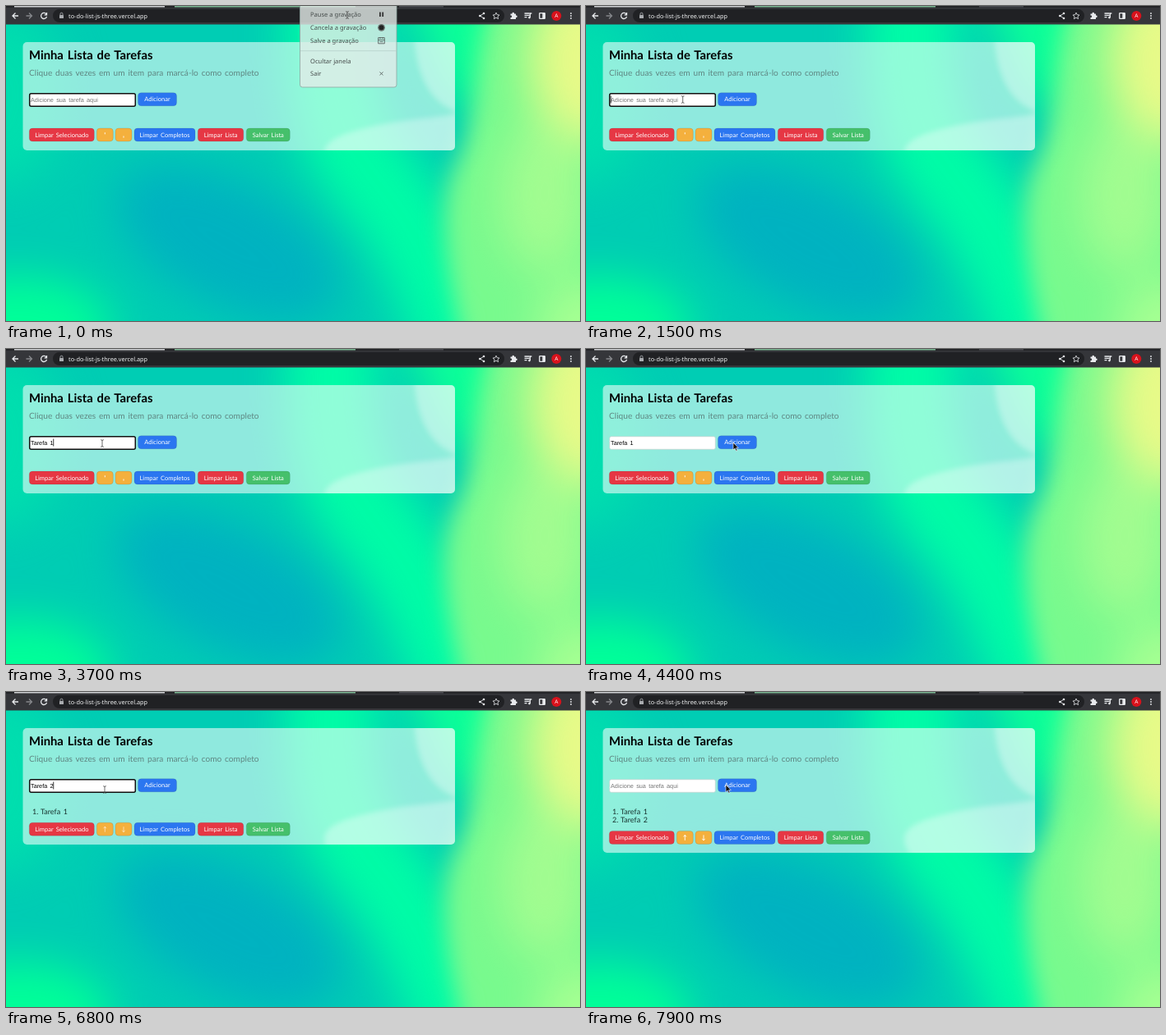
An HTML page that plays this animation: 698 by 384 pixels, repeating every 8 s.

```html
<!DOCTYPE html>
<html lang="pt-BR">
<head>
<meta charset="utf-8">
<title>Minha Lista de Tarefas</title>
<style>
html, body { margin: 0; width: 100%; height: 100%; overflow: hidden; background: #00cdb4; }
svg { display: block; width: 698px; height: 384px; }
text { text-rendering: geometricPrecision; white-space: pre; }
.page { font-family: Lato, "Open Sans", sans-serif; word-spacing: .08em; }
.ui { font-family: "Noto Sans", "Open Sans", sans-serif; }
.field { font: 7.27px "Liberation Sans", Arial, sans-serif; }
.btn { font-size: 7.5px; fill: #fff; text-anchor: middle; }
.item { font-size: 9px; fill: #16302c; }
.line { fill: none; stroke: #e8eaed; stroke-width: 1.3; }
</style>
</head>
<body>
<svg viewBox="0 0 698 384">
  <defs>
    <filter id="soft" x="-20%" y="-20%" width="140%" height="140%" color-interpolation-filters="sRGB"><feGaussianBlur stdDeviation="27"/></filter>
    <filter id="mild" x="-20%" y="-20%" width="140%" height="140%"><feGaussianBlur stdDeviation="3"/></filter>
    <filter id="edge" x="-20%" y="-20%" width="140%" height="140%" color-interpolation-filters="sRGB"><feGaussianBlur stdDeviation="14"/></filter>
    <clipPath id="cardClip"><rect id="clipRect" x="20.5" y="44" width="525.5" rx="5"/></clipPath>
  </defs>

  <rect width="698" height="384" fill="#00cdb4"/>
  <g filter="url(#soft)">
    <ellipse cx="0" cy="110" rx="70" ry="110" fill="#00deae"/>
    <ellipse cx="15" cy="395" rx="115" ry="65" fill="#00ff98"/>
    <ellipse cx="270" cy="290" rx="150" ry="75" transform="rotate(28 270 290)" fill="#00b2c0"/>
    <path d="M400-40C390 60 390 140 440 200S520 300 560 440" fill="none" stroke="#00fca6" stroke-width="110"/>
    <path d="M470-50H760V120H540Z" fill="#0cff98"/>
  </g>
  <g filter="url(#edge)">
    <path d="M598-30C562 60 578 140 545 195C525 240 530 300 560 430H760V-30Z" fill="#78fa8e"/>
  </g>
  <g filter="url(#soft)">
    <ellipse cx="705" cy="65" rx="70" ry="105" fill="#e8fa88"/>
    <ellipse cx="655" cy="230" rx="55" ry="95" fill="#a2fc90"/>
    <ellipse cx="705" cy="395" rx="60" ry="60" fill="#a8ff92"/>
  </g>

  <g clip-path="url(#cardClip)">
    <rect x="20" y="44" width="527" height="160" fill="#fff" opacity=".56"/>
    <g fill="#fff" opacity=".32" filter="url(#mild)">
      <path d="M387 178C388 160 425 150 470 142C505 136 535 136 560 128V215H415C400 205 387 195 387 178Z"/>
      <path d="M496 30C498 80 512 122 560 132V30Z"/>
    </g>
  </g>

  <g class="page">
    <text x="28" y="64.5" font-size="14.8" font-weight="700">Minha Lista de Tarefas</text>
    <text x="28" y="85" font-size="10.15" fill="#5f8682">Clique duas vezes em um item para marcá-lo como completo</text>
    <rect id="box" x="28.7" y="106.7" width="128.6" height="15.6" rx="2" fill="#fff"/>
    <text id="value" class="field" x="30" y="116.6"></text>
    <path id="caret" stroke="#000" stroke-width=".8"/>
    <g id="addBtn"></g>
    <g id="items"></g>
    <g id="actions"></g>
  </g>

  <g class="ui">
    <rect width="698" height="22.5" fill="#35363a"/>
    <rect width="698" height="1.7" fill="#202124"/>
    <path d="M10 .7H193" stroke="#cfd1d4" stroke-width="1.4"/>
    <path d="M205 .7H425" stroke="#7cb894" stroke-width="1.4"/>
    <path d="M478 .7H532" stroke="#4a4b50" stroke-width="1.4"/>
    <rect x="57" y="3.7" width="549" height="16.4" rx="8.2" fill="#202124"/>
    <g class="line">
      <path d="M15 12H8M11.5 8.5L8 12L11.5 15.5"/>
      <path d="M24.5 12H31.5M28 8.5L31.5 12L28 15.5" stroke="#85878b"/>
      <path d="M49 10A3.5 3.5 0 1 0 49.5 12.8M49.5 8V10.8H46.7"/>
      <path d="M66 11V9.7a1.5 1.5 0 0 1 3 0V11" stroke-width=".9" stroke="#a9acb0"/>
      <path d="M581 9L576.5 12L581 15" stroke-width=".9"/>
      <path d="M596 8L597.2 10.7L600 11L597.9 12.9L598.6 15.7L596 14.2L593.4 15.7L594.1 12.9L592 11L594.8 10.7Z" stroke-width=".8"/>
      <path d="M630.5 9H636.5M630.5 11.3H636.5M630.5 13.6H633.5M637.3 14V9H639.3"/>
      <rect x="648.7" y="8.7" width="6.6" height="6.6" rx=".6"/>
    </g>
    <g fill="#e8eaed">
      <rect x="65" y="11" width="5" height="4" rx=".6" fill="#a9acb0"/>
      <circle cx="581" cy="9" r="1.3"/><circle cx="576.3" cy="12" r="1.3"/><circle cx="581" cy="15" r="1.3"/>
      <path d="M613.5 9.5H615.5A1.3 1.3 0 1 1 618 9.5H620V11.5A1.3 1.3 0 1 1 620 14V16H613.5V14A1.3 1.3 0 1 0 613.5 11.5Z"/>
      <circle cx="636.4" cy="14.1" r="1.3"/>
      <rect x="652.3" y="8.7" width="3" height="6.6"/>
      <circle cx="687" cy="9" r=".9"/><circle cx="687" cy="12" r=".9"/><circle cx="687" cy="15" r=".9"/>
    </g>
    <circle cx="669.3" cy="12" r="6" fill="#d8121c"/>
    <text x="669.3" y="14.4" font-size="6.5" fill="#fff" text-anchor="middle">A</text>
    <text x="76" y="14.6" font-size="7.3" fill="#f1f3f4">to-do-list-js-three.vercel.app</text>

    <g id="menu">
      <path d="M357.5-5V96a3 3 0 0 0 3 3H472a3 3 0 0 0 3-3V-5Z" fill="#e4ebe9" fill-opacity=".8" stroke="#8fa5a0" stroke-width=".8"/>
      <path d="M358 54.7H475" stroke="#b4ccc6" stroke-width=".7"/>
      <g id="menuText" font-size="7.55" fill="#474d4c"></g>
      <path d="M454.9 7.5V13M458.2 7.5V13" stroke="#333" stroke-width="1.8"/>
      <circle cx="456.5" cy="26.3" r="4.4" fill="#6c7472"/><circle cx="456.5" cy="26.3" r="3" fill="#222"/>
      <g fill="none" stroke="#5a6361" stroke-width=".9">
        <path d="M452.7 38.6H460.3V45.8H452.7ZM452.7 41.4H460.3M455 38V40M458 38V40M454.5 43.6H458.5"/>
        <path d="M454.5 80.4L458.5 84.4M458.5 80.4L454.5 84.4"/>
      </g>
    </g>
  </g>

  <g id="cursor">
    <path id="arrow" d="M0 0V9L2.1 7.1L3.6 10.3L5 9.7L3.6 6.6H6.3Z" fill="#111" stroke="#fff" stroke-width=".6"/>
    <path id="beam" d="M-1.8-4.3Q0-4.3 0-3.4Q0-4.3 1.8-4.3M0-3.8V3.8M-1.8 4.3Q0 4.3 0 3.4Q0 4.3 1.8 4.3" fill="none" stroke="#444" stroke-width=".8"/>
  </g>
</svg>
<script>
const LOOP = 8000, STEP = 100;
const RED = '#e63744', AMBER = '#f4b03d', BLUE = '#2b76f0', GREEN = '#45c06b';
const $ = id => document.getElementById(id);
const set = (el, attrs) => { for (const k in attrs) el.setAttribute(k, attrs[k]); };
const show = (el, on) => { el.style.display = on ? '' : 'none'; };

// Cursor path: time, x, y
const path = [
  [0, 415, 11], [100, 392, 30], [300, 230, 74], [500, 128, 97], [900, 122, 108],
  [1600, 117, 115], [3900, 117, 115], [4000, 140, 117], [4200, 179, 114],
  [4600, 179, 114], [5000, 120, 119], [7300, 120, 119], [7600, 170, 113], [8000, 170, 113]
];
// Field contents: time, text
const typing = [
  [0, ''], [2100, 'T'], [2200, 'Ta'], [2300, 'Tar'], [2400, 'Tare'], [2600, 'Taref'],
  [2700, 'Tarefa'], [3200, 'Tarefa '], [3400, 'Tarefa 1'], [4500, ''], [6200, 'T'],
  [6400, 'Tare'], [6500, 'Tarefa'], [6700, 'Tarefa '], [6800, 'Tarefa 2'], [7800, '']
];
const focus = [[0, true], [4400, false], [5100, true], [7700, false]];
const count = [[0, 0], [4500, 1], [7800, 2]];

const at = (steps, t) => steps.filter(s => s[0] <= t).pop()[1];

function cursorAt(t) {
  const i = Math.max(1, path.findIndex(p => p[0] > t));
  const [t0, x0, y0] = path[i - 1], [t1, x1, y1] = path[i];
  const k = (t - t0) / (t1 - t0);
  return [x0 + (x1 - x0) * k, y0 + (y1 - y0) * k];
}

const button = (x, w, y, color, label) =>
  `<rect x="${x}" y="${y}" width="${w}" height="16" rx="4" fill="${color}" stroke="#123" stroke-opacity=".14" stroke-width=".8"/>` +
  `<text class="btn" x="${x + w / 2}" y="${y + 10.6}">${label}</text>`;

$('addBtn').innerHTML = button(160.5, 47, 105.7, BLUE, 'Adicionar');
$('actions').innerHTML =
  button(28.3, 79, 149, RED, 'Limpar Selecionado') +
  button(110.3, 20, 149, AMBER, '') + button(133, 20, 149, AMBER, '') +
  button(156, 74, 149, BLUE, 'Limpar Completos') +
  button(233.3, 55.5, 149, RED, 'Limpar Lista') +
  button(292.3, 53, 149, GREEN, 'Salvar Lista') +
  '<path id="arrows" fill="none" stroke="#fff" stroke-width=".9"/>';
$('items').innerHTML = [1, 2].map(n =>
  `<g class="item"><text x="32" y="${138.6 + n * 10.2}">${n}.</text>` +
  `<text x="42" y="${138.6 + n * 10.2}">Tarefa ${n}</text></g>`).join('');
$('menuText').innerHTML = [
  ['Pause a gravação', 13.3], ['Cancela a gravação', 29.2], ['Salve a gravação', 44.8],
  ['Ocultar janela', 69.6], ['Sair', 85.2]
].map(([s, y]) => `<text x="370" y="${y}">${s}</text>`).join('');

const TIPS = 'M120.3 154.2V156.3M143 158.5V160.6';
const ARROWS = 'M120.3 160.5V154M118.6 156L120.3 154L122 156M143 154V160.5M141.3 158.5L143 160.5L144.7 158.5';

function draw(t) {
  const n = at(count, t), focused = at(focus, t), text = at(typing, t);
  const [x, y] = cursorAt(t);
  const overField = x > 28 && x < 158 && y > 105 && y < 124;

  show($('menu'), t < 100);
  $('clipRect').setAttribute('height', 132 + n * 10);
  $('actions').setAttribute('transform', `translate(0 ${n * 10.2})`);
  [...$('items').children].forEach((el, i) => show(el, i < n));
  set($('arrows'), { d: n ? ARROWS : TIPS, opacity: n === 1 ? .6 : 1 });

  set($('box'), focused
    ? { stroke: '#101010', 'stroke-width': 1.5 }
    : { stroke: '#c3d5d2', 'stroke-width': .8 });
  const value = $('value');
  value.textContent = text || 'Adicione sua tarefa aqui';
  value.setAttribute('fill', text ? '#000' : '#757575');
  show($('caret'), focused && t >= 300);
  const cx = 30.2 + (text ? value.getComputedTextLength() : 0);
  $('caret').setAttribute('d', `M${cx} 109.5V118.5`);

  $('cursor').setAttribute('transform', `translate(${x} ${y})`);
  const beam = overField || t < 100;
  show($('beam'), beam);
  show($('arrow'), !beam);
}

let last = -1;
function tick() {
  const t = Math.floor(performance.now() % LOOP / STEP) * STEP;
  if (t !== last) draw(last = t);
  requestAnimationFrame(tick);
}
draw(0);
requestAnimationFrame(tick);
</script>
</body>
</html>
```
